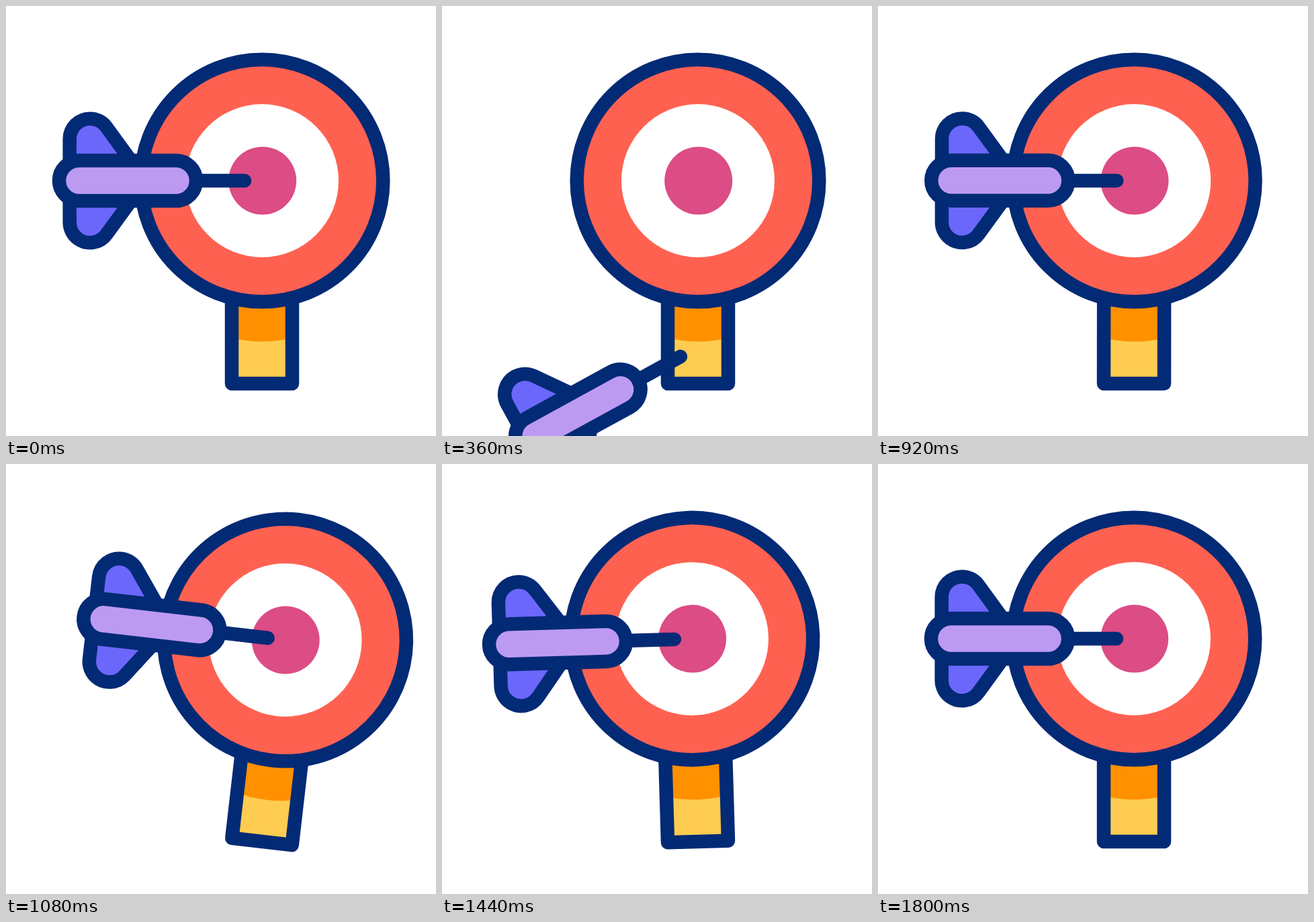
An HTML page with a canvas that plays this animation: 640 px wide and 640 px high, repeating every 2 s.

```html
<!DOCTYPE html>
<html lang="en">
<head>
<meta charset="utf-8">
<title>Dart and target</title>
<style>
  html, body { margin: 0; width: 100%; height: 100%; overflow: hidden; background: #fff; }
  canvas { display: block; width: 640px; height: 640px; }
</style>
</head>
<body>
<canvas id="stage" width="640" height="640"></canvas>
<script>
const ctx = document.getElementById('stage').getContext('2d');
const LOOP = 2000, STEP = 40;
const NAVY = '#032a75', RED = '#ff6151', PINK = '#dc4c85', ORANGE = '#ff9000',
      YELLOW = '#fdcc50', LILAC = '#bd9af2', BLUE = '#6b67fb';
const PIVOT = { x: 381, y: 562 };
const TIP = { x: 355, y: 260 };

// Keyframes: [time, value]
const SWING = [[915, 0], [1015, 8], [1352, -6.75], [1525, 3.05], [1800, 0]];
const FALL = { from: 0, to: 655, drop: 456 };
const FLIGHT = { from: 655, to: 915, dx: -508, dy: 27 };
const TILT = -50;

const rad = deg => deg * Math.PI / 180;
const smooth = u => u * u * (3 - 2 * u);

function ease(t, from, to) {
  return smooth(Math.min(1, Math.max(0, (t - from) / (to - from))));
}

function track(keys, t) {
  let value = keys[0][1];
  for (let i = 1; i < keys.length; i++) {
    const [t0, v0] = keys[i - 1], [t1, v1] = keys[i];
    if (t >= t0) value = v0 + (v1 - v0) * ease(t, t0, t1);
  }
  return value;
}

function dartPose(t) {
  if (t < FALL.to) {
    const p = ease(t, FALL.from, FALL.to);
    return { x: 0, y: FALL.drop * p, angle: TILT * p };
  }
  const left = 1 - ease(t, FLIGHT.from, FLIGHT.to);
  return { x: FLIGHT.dx * left, y: FLIGHT.dy * left, angle: TILT * left };
}

function paint(path, fill, outlined) {
  if (fill) {
    ctx.fillStyle = fill;
    ctx.fill(path);
  }
  if (outlined) ctx.stroke(path);
}

function shape(build) {
  const path = new Path2D();
  build(path);
  return path;
}

const disc = (x, y, r) => shape(p => p.arc(x, y, r, 0, 2 * Math.PI));

const post = shape(p => p.rect(336, 400, 90, 162));
const body = shape(p => p.roundRect(79, 230, 204, 60, 30));
const needle = shape(p => {
  p.moveTo(283, TIP.y);
  p.lineTo(TIP.x, TIP.y);
});
const fins = shape(p => {
  const lean = Math.atan2(0.59, 0.81);
  p.arc(125, 198, 30.3, Math.PI, 2 * Math.PI - lean);
  p.lineTo(207.7, 260);
  p.arc(125, 322, 30.3, lean, Math.PI);
  p.closePath();
});

function drawTarget() {
  paint(post, YELLOW);
  ctx.save();
  ctx.clip(post);
  paint(disc(381, 309, 190.5), ORANGE);
  ctx.restore();
  paint(post, null, true);

  paint(disc(381, 260, 180.3), RED, true);
  paint(disc(381, 260, 114), '#fff');
  paint(disc(381.7, 260, 50.5), PINK);
}

function drawDart({ x, y, angle }) {
  ctx.save();
  ctx.translate(TIP.x + x, TIP.y + y);
  ctx.rotate(rad(angle));
  ctx.translate(-TIP.x, -TIP.y);
  paint(fins, BLUE, true);
  paint(needle, null, true);
  paint(body, LILAC, true);
  ctx.restore();
}

function draw(t) {
  ctx.fillStyle = '#fff';
  ctx.fillRect(0, 0, 640, 640);
  ctx.strokeStyle = NAVY;
  ctx.lineWidth = 20.5;
  ctx.lineJoin = ctx.lineCap = 'round';

  ctx.save();
  ctx.translate(PIVOT.x, PIVOT.y);
  ctx.rotate(rad(track(SWING, t)));
  ctx.translate(-PIVOT.x, -PIVOT.y);
  drawTarget();
  drawDart(dartPose(t));
  ctx.restore();
}

const start = performance.now();
function tick() {
  const t = (performance.now() - start) % LOOP;
  draw(Math.floor(t / STEP) * STEP);
  requestAnimationFrame(tick);
}
tick();
</script>
</body>
</html>
```
